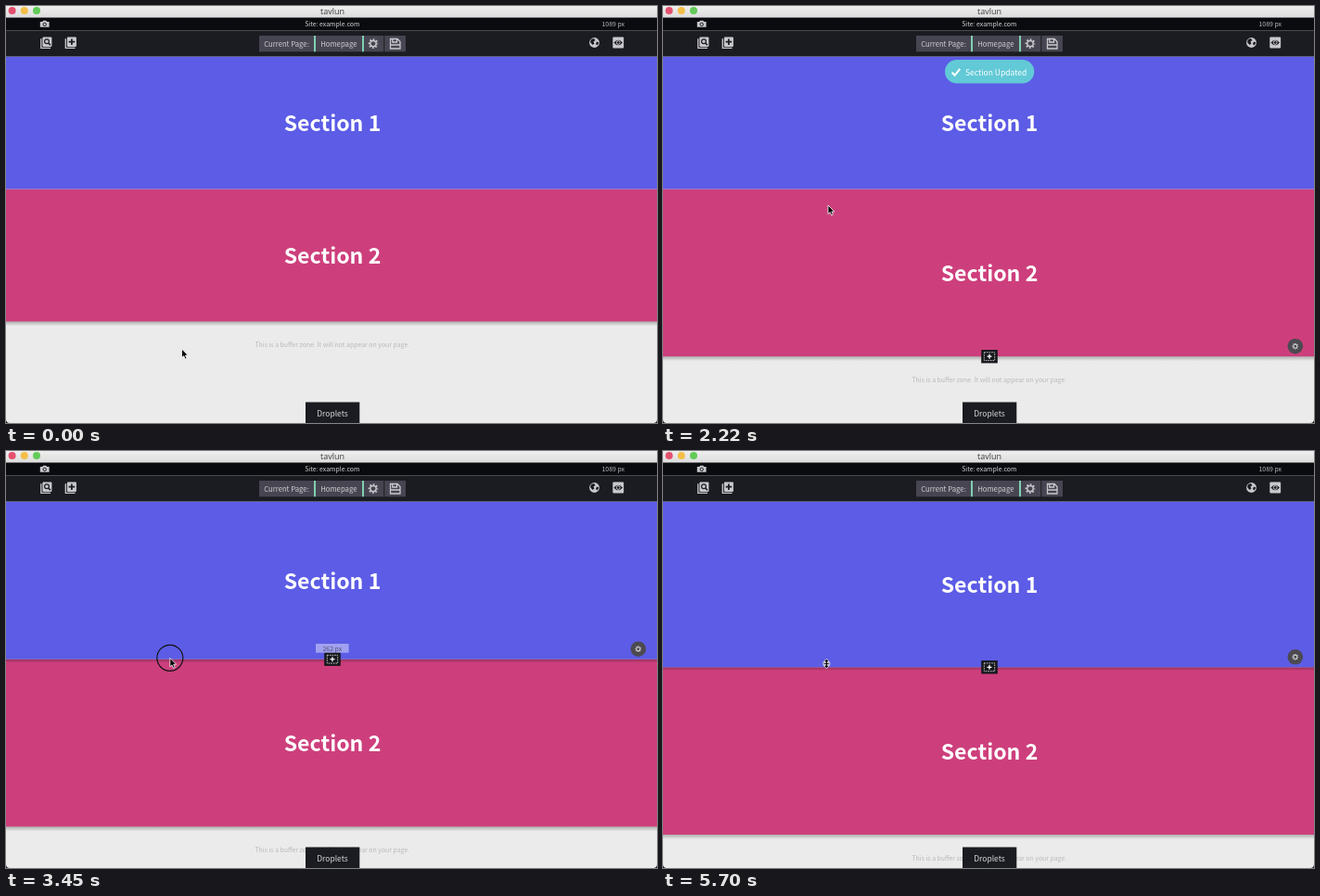
Animation of 702 by 450 pixels, one loop 5730 ms. Source, as an HTML page:

```html
<!DOCTYPE html>
<html lang="en">
<head>
<meta charset="utf-8">
<title>Page builder</title>
<style>
  html, body { margin: 0; width: 100%; height: 100%; overflow: hidden; background: #16161a; }
  svg { display: block; width: 702px; height: 450px; }
  text { font-family: "Noto Sans CJK JP", "Noto Sans CJK SC", "Noto Sans CJK", "Noto Sans", sans-serif; }
  .mid { text-anchor: middle; }
  .heading { font-size: 23.1px; font-weight: 700; fill: #fff; }
  .small { font-size: 6.93px; }
  .nav { font-size: 7.73px; fill: #cfcfd3; }
  .line { fill: none; stroke: #c9c9cd; }
  .seg { fill: #474551; }
  .mint { fill: #7fcfb2; }
</style>
</head>
<body>
<svg viewBox="0 0 702 450">
  <defs>
    <linearGradient id="chrome" x2="0" y2="1">
      <stop stop-color="#efefef"/><stop offset="1" stop-color="#dcdcdc"/>
    </linearGradient>
    <linearGradient id="fade" x2="0" y2="1">
      <stop stop-opacity=".26"/><stop offset="1" stop-opacity="0"/>
    </linearGradient>
    <clipPath id="window"><path d="M0 0H702V446Q702 450 698 450H4Q0 450 0 446Z"/></clipPath>
    <g id="gear" fill="none">
      <circle r="3.2" stroke-width="1.5"/>
      <circle r="4.5" stroke-width="1.8" stroke-dasharray="1.7 1.834" stroke-dashoffset=".85"/>
    </g>
    <g id="stack">
      <path class="line" d="M-5.2 -4.5V5.6H5" stroke-width="1.3"/>
      <rect x="-3.6" y="-6.3" width="10" height="10.4" rx="1" fill="#c9c9cd"/>
    </g>
  </defs>

  <g clip-path="url(#window)">
    <rect width="702" height="450" fill="#ebebeb"/>

    <g id="buffer"><text class="mid small" x="351.8" y="27.6" fill="#b9b9b9">This is a buffer zone. It will not appear on your page.</text></g>

    <rect id="box2" width="702" fill="#cd3f7c"/>
    <rect id="shade2" width="702" height="5" fill="url(#fade)"/>
    <rect id="box1" y="54.5" width="702" fill="#5c5ce6"/>
    <rect id="shade1" width="702" height="4" fill="url(#fade)"/>
    <text id="head1" class="mid heading" x="352">Section 1</text>
    <text id="head2" class="mid heading" x="352">Section 2</text>

    <g id="tools">
      <circle cx="681.8" cy="-11" r="8.3" fill="#4c4a50"/>
      <use href="#gear" stroke="#e6e6e6" transform="translate(681.8 -11) scale(.62)"/>
      <rect x="343.2" y="-7.2" width="17.6" height="14.4" fill="#17181c"/>
      <rect x="346.3" y="-4.4" width="11.4" height="8.8" fill="none" stroke="#d8d8d8" stroke-width=".9" stroke-dasharray="1.6 1"/>
      <path d="M349.5 0H354.5M352 -2.5V2.5" stroke="#fff" stroke-width="1.3"/>
      <g id="size">
        <rect x="334" y="-16.7" width="35.6" height="9.7" fill="#fff" opacity=".42"/>
        <text id="sizeText" class="mid small" x="351.8" y="-9.2" fill="#33333d" fill-opacity=".72"></text>
      </g>
    </g>

    <rect x="323" y="427.5" width="58.3" height="23" fill="#1b1c21"/>
    <text class="mid" x="352" y="443.2" font-size="8.5" fill="#d6d6d8">Droplets</text>

    <rect width="702" height="12.5" fill="url(#chrome)"/>
    <circle cx="6.6" cy="5" r="4" fill="#e4516e"/>
    <circle cx="19.8" cy="5" r="4" fill="#f3bf48"/>
    <circle cx="33" cy="5" r="4" fill="#62cb58"/>
    <text class="mid" x="352" y="8.7" fill="#3c3c3c" style="font:9px 'Open Sans',sans-serif">tavlun</text>

    <rect y="12.5" width="702" height="14" fill="#0a0b0e"/>
    <text class="mid small" x="351.8" y="21.8" fill="#d3d3d5">Site: example.com</text>
    <text class="small" x="667" y="21.8" text-anchor="end" fill="#b9b9bd">1089 px</text>
    <path d="M36.8 17H39.2L40.2 15.8H43.2L44.2 17H46.6V22.8H36.8Z" fill="#c9c9cd"/>
    <circle cx="41.7" cy="19.8" r="1.7" fill="#c9c9cd" stroke="#0a0b0e" stroke-width=".9"/>

    <rect y="26.5" width="702" height="28" fill="#1b1c21"/>
    <g transform="translate(43 39.8)">
      <use href="#stack"/>
      <circle cx="1" cy="-1.5" r="2.4" fill="none" stroke="#1b1c21" stroke-width="1.2"/>
      <path d="M2.8 .3L4.9 2.4" stroke="#1b1c21" stroke-width="1.5"/>
    </g>
    <g transform="translate(69.5 39.8)">
      <use href="#stack"/>
      <path d="M-1.9 -1.1H4.7M1.4 -4.4V2.2" stroke="#1b1c21" stroke-width="1.7"/>
    </g>

    <rect class="seg" x="273" y="32" width="59" height="17.3"/>
    <rect class="mint" x="332" y="32" width="2" height="17.3"/>
    <rect class="seg" x="334" y="32" width="50" height="17.3"/>
    <rect class="mint" x="384" y="32" width="2" height="17.3"/>
    <rect class="seg" x="386" y="32" width="21.3" height="17.3"/>
    <rect class="seg" x="408.3" y="32" width="22.7" height="17.3"/>
    <text class="mid nav" x="302.5" y="43.6">Current Page:</text>
    <text class="mid nav" x="358.8" y="43.6">Homepage</text>
    <use href="#gear" x="396" y="40.6" stroke="#c9c9cd"/>
    <path class="line" d="M414.5 35.5H422L425 38.5V46H414.5ZM416.8 35.5V39H421.5V35.5M414.5 42H425" stroke-width="1.3"/>

    <circle cx="634.5" cy="39.5" r="5.4" fill="#c9c9cd"/>
    <path d="M631 36L634 35L635.5 37L633.5 38.5L634.5 40.5L632.5 42L630 39ZM637 38.5L639.5 39.5L637.5 42.5L636 41Z" fill="#1b1c21"/>
    <rect x="654.3" y="33.5" width="11.8" height="12" rx="1" fill="#c9c9cd"/>
    <path d="M655.4 39.5Q660.2 33.8 665 39.5Q660.2 45.2 655.4 39.5Z" fill="#1b1c21"/>
    <circle cx="660.2" cy="39.5" r="1.9" fill="#1b1c21" stroke="#c9c9cd" stroke-width="1"/>

    <g id="toast">
      <rect x="304" y="58" width="96.3" height="25.6" rx="12.8" fill="#62c9d6"/>
      <path d="M311.6 71.8L314.6 74.8L320.2 67.8" fill="none" stroke="#fff" stroke-width="2.1"/>
      <text x="326" y="74.8" font-size="8.5" fill="#fff">Section Updated</text>
    </g>

    <g id="pointer">
      <circle id="press" r="14" fill="none" stroke="#111" stroke-width="1.2"/>
      <path id="arrow" d="M0 0V9.6L2.2 7.6L3.7 11L5.4 10.2L3.9 7H6.8Z" fill="#000" stroke="#fff" stroke-width=".8"/>
      <path id="resize" d="M0 -5.2L3.1 -1.9H1V-.8H3.6V.8H1V1.9H3.1L0 5.2L-3.1 1.9H-1V.8H-3.6V-.8H-1V-1.9H-3.1Z" fill="#000" stroke="#fff" stroke-width=".8"/>
    </g>
  </g>
</svg>
<script>
  const LOOP = 5730, TOP = 54.5, BASE = 143, PX = 1089 / 702;
  const el = Object.fromEntries([...document.querySelectorAll("[id]")].map(e => [e.id, e]));

  // Key points are [time, value]
  const grow1 = [[2820, 0], [3090, 11.5], [3350, 24], [3600, 32], [3850, 35.2], [4100, 35.8]];
  const grow2 = [[900, 0], [1200, 22], [1470, 33], [1650, 36.7], [1800, 37.7]];
  const pointerX = [[120, 189.5], [500, 186], [1470, 184], [1800, 183], [2200, 178], [3090, 178], [3600, 176.3]];
  const pointerY = [[120, 370], [300, 354], [500, 340], [880, 339], [1200, 362], [1470, 373], [1800, 378],
    [1920, 350], [2080, 250], [2200, 215], [2480, 214], [2680, 197], [2800, 197], [3090, 214.5], [3600, 227], [4000, 229.5]];
  const toastAlpha = [[1930, 0], [2100, 1], [2720, 1], [2930, 0], [4430, 0], [4600, 1], [5220, 1], [5430, 0]];

  function at(keys, t) {
    const i = keys.findIndex(k => k[0] > t);
    if (i < 0) return keys[keys.length - 1][1];
    if (!i) return keys[0][1];
    const [t0, a] = keys[i - 1], [t1, b] = keys[i];
    return a + (b - a) * (t - t0) / (t1 - t0);
  }
  const within = (t, from, to) => t >= from && t < to;
  const show = (e, on) => e.setAttribute("visibility", on ? "inherit" : "hidden");
  const move = (e, x, y) => e.setAttribute("transform", `translate(${x} ${y})`);

  function draw(t) {
    const h1 = BASE + at(grow1, t), h2 = BASE + at(grow2, t);
    const edge1 = TOP + h1, edge2 = edge1 + h2;
    const first = t >= 2620;

    el.box1.setAttribute("height", h1);
    el.box2.setAttribute("y", edge1);
    el.box2.setAttribute("height", h2);
    el.shade1.setAttribute("y", edge1);
    el.shade2.setAttribute("y", edge2);
    show(el.shade1, first);
    el.head1.setAttribute("y", TOP + h1 / 2 + 9.3);
    el.head2.setAttribute("y", edge1 + h2 / 2 + 9.3);
    move(el.buffer, 0, edge2);

    show(el.tools, t >= 450);
    move(el.tools, 0, first ? edge1 : edge2);
    show(el.size, within(t, 930, 1830) || within(t, 2850, 4260));
    el.sizeText.textContent = Math.round((first ? h1 : h2) * PX - 2.2) + " px";

    el.toast.setAttribute("opacity", at(toastAlpha, t));
    move(el.pointer, at(pointerX, t), at(pointerY, t));
    show(el.press, within(t, 780, 1830) || within(t, 2780, 4260));
    const resizing = t >= 4260;
    show(el.resize, resizing);
    show(el.arrow, !resizing);
  }

  const start = performance.now();
  function tick() {
    const t = (performance.now() - start) % LOOP;
    draw(Math.floor(t / 30) * 30);
    requestAnimationFrame(tick);
  }
  tick();
</script>
</body>
</html>
```
